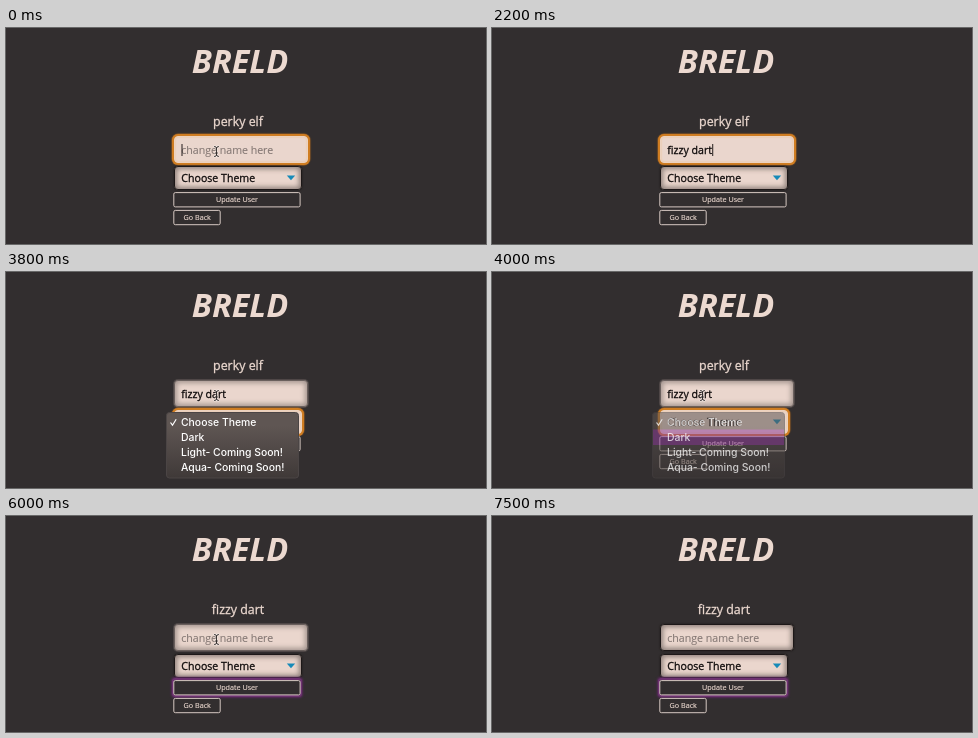
An HTML page that plays this animation: 480x216 px, repeating every 8.3 s.

```html
<!DOCTYPE html>
<html lang="en">
<head>
<meta charset="utf-8">
<title>Profile settings</title>
<style>
  html, body { margin: 0; width: 100%; height: 100%; overflow: hidden; background: #322e2f; }
  .stage { position: relative; width: 480px; height: 216px; overflow: hidden; }
  .box { position: absolute; box-sizing: border-box; }
  .field {
    left: 168px; border-radius: 4px; background: #ead6cd;
    border: 1px solid #1d1818;
    box-shadow: inset 0 0 5px 2px #51474499, 0 0 2px #1b1717;
  }
  #input { top: 108px; width: 133.5px; height: 27px; }
  #select { top: 138px; width: 128px; height: 24px; }
  #input.hover {
    border-color: #6a605d;
    box-shadow: inset 0 0 5px 2px #776b6799, 0 0 0 1px #5d5553aa;
  }
  #input.focus, #select.focus {
    border-color: #ecd2bf;
    box-shadow: inset 0 0 2px #efc08e, 0 0 0 2px #cf7d22, 0 0 1px 2.5px #9c5f20;
  }
  #ring { left: 166px; top: 162px; width: 130px; height: 19px; border-radius: 3px; }
  #ring.thin { border: 1px solid #8d818180; }
  #ring.purple { box-shadow: inset 0 0 0 2px #6d3170, 0 0 2px 1px #57285c; }
  svg { position: absolute; inset: 0; font-family: "Open Sans", "Noto Sans", sans-serif; }
  .button { fill: #322e2f; stroke: #d6c8c2; }
  .light { fill: #ecd9d0; stroke: #ecd9d0; stroke-width: .15; text-anchor: middle; }
  .title { font-size: 32.5px; font-weight: 700; font-style: italic; stroke: none; }
  .name { font-size: 12.4px; stroke-width: .3; }
  .small { font-size: 7.2px; }
  .value { font-size: 10.6px; fill: #110d0d; stroke: #110d0d; stroke-width: .3; }
  .value.hint { fill: #837773; stroke: #837773; stroke-width: .1; }
  #menu { font: 500 10.4px Inter, Roboto, sans-serif; fill: #fff; }
</style>
</head>
<body>
<div class="stage">
  <div class="box field" id="input"></div>
  <div class="box field" id="select"></div>
  <div class="box" id="ring"></div>
  <svg width="480" height="216" viewBox="0 0 480 216">
    <defs>
      <linearGradient id="shade" x2="0" y2="1">
        <stop offset=".2" stop-color="#5f5653"/>
        <stop offset="1" stop-color="#3f3938"/>
      </linearGradient>
    </defs>
    <rect class="button" x="167.8" y="164.6" width="126.3" height="14.3" rx="1.5"/>
    <rect class="button" x="167.8" y="182.4" width="46.4" height="14.3" rx="1.5"/>
    <text class="light title" x="234" y="44.5">BRELD</text>
    <text class="light name" id="name" x="232" y="98.3"></text>
    <text class="value" id="entry" x="175.3" y="126"></text>
    <path id="caret" d="M0 116v12" stroke="#221b1a"/>
    <text class="value" id="theme" x="175.3" y="154"></text>
    <path d="M280.8 147.6h8.4l-4.2 4.6z" fill="#168ab8"/>
    <text class="light small" x="231" y="174.1">Update User</text>
    <text class="light small" x="191.2" y="192.1">Go Back</text>
    <g id="menu">
      <g id="panel">
        <rect x="160.5" y="140.5" width="132" height="65.5" rx="3" fill="url(#shade)" stroke="#4b4545"/>
        <rect id="highlight" x="161" width="131" height="15.5" fill="#8f4199"/>
      </g>
      <g id="options">
        <path d="M164.5 150.5l2 2.7 3.7-6" fill="none" stroke="#fff" stroke-width="1.2"/>
        <text x="175" y="153.8">Choose Theme</text>
        <text x="175" y="168.8">Dark</text>
        <text x="175" y="183.8">Light- Coming Soon!</text>
        <text x="175" y="198.8">Aqua- Coming Soon!</text>
      </g>
    </g>
    <g id="cursor" fill="none" stroke-linecap="round">
      <g id="beam">
        <path d="M-2-5Q0-5 0-3.5V3.5Q0 5-2 5M2-5Q0-5 0-3.5M0 3.5Q0 5 2 5M-1 1.5h2" stroke="#fff8" stroke-width="2"/>
        <path d="M-2-5Q0-5 0-3.5V3.5Q0 5-2 5M2-5Q0-5 0-3.5M0 3.5Q0 5 2 5M-1 1.5h2" stroke="#292322" stroke-width=".9"/>
      </g>
      <path id="arrow" d="M0 0V9.5L2.2 7.5 3.7 11 5.2 10.3 3.7 7H6.6Z" fill="#111" stroke="#eee" stroke-width=".7"/>
    </g>
  </svg>
</div>
<script>
const LOOP = 8300;
const OLD_NAME = "perky elf";
const NEW_NAME = "fizzy dart";
const KEY_TIMES = [500, 600, 800, 900, 1200, 1400, 1700, 1900, 2000, 2200];
const $ = id => document.getElementById(id);
const show = (id, on) => { $(id).style.display = on ? "" : "none"; };
const put = (id, text) => { if ($(id).textContent !== text) $(id).textContent = text; };

function drawEntry(t) {
  const count = t < 5200 ? KEY_TIMES.filter(k => k <= t).length : 0;
  const entry = $("entry");
  put("entry", count ? NEW_NAME.slice(0, count) : "change name here");
  entry.classList.toggle("hint", !count);
  entry.style.whiteSpace = "pre";
  const width = count ? entry.getComputedTextLength() : 0;
  $("caret").setAttribute("transform", `translate(${176 + width} 0)`);
  show("caret", t < 300 || (t >= 500 && t < 2700));
}

function drawMenu(t) {
  const open = t >= 3100 && t < 4200;
  show("menu", open);
  if (!open) return;
  const opacity = t < 4000 ? 1 : t < 4100 ? 0.55 : 0.22;
  $("panel").style.opacity = opacity;
  $("options").style.opacity = Math.sqrt(opacity);
  $("highlight").setAttribute("y", t < 3400 ? 142.5 : 157.5);
  show("highlight", t < 3800 || t >= 3900);
}

function drawCursor(t) {
  const step = Math.max(0, Math.floor((t - 6700) / 100));
  const y = 123.5 + step * 13;
  const overInput = y < 136;
  show("cursor", (t < 500 || t >= 3100) && t < 7500);
  show("beam", overInput);
  show("arrow", !overInput);
  $("cursor").setAttribute("transform", `translate(${210.5 + step * 3} ${y})`);
  $("input").classList.toggle("hover", overInput);
}

function draw(t) {
  put("name", t < 5700 ? OLD_NAME : NEW_NAME);
  put("theme", t >= 4200 && t < 5200 ? "Dark" : "Choose Theme");
  $("input").classList.toggle("focus", t < 2700);
  $("select").classList.toggle("focus", t >= 2700 && t < 4600);
  $("ring").classList.toggle("thin", t >= 4600 && t < 4700);
  $("ring").classList.toggle("purple", t >= 4700);
  $("ring").style.opacity = t >= 4700 && t < 4800 ? 0.5 : 1;
  drawEntry(t);
  drawMenu(t);
  drawCursor(t);
}

const start = performance.now();
function tick() {
  draw((performance.now() - start) % LOOP);
  requestAnimationFrame(tick);
}
tick();
</script>
</body>
</html>
```
